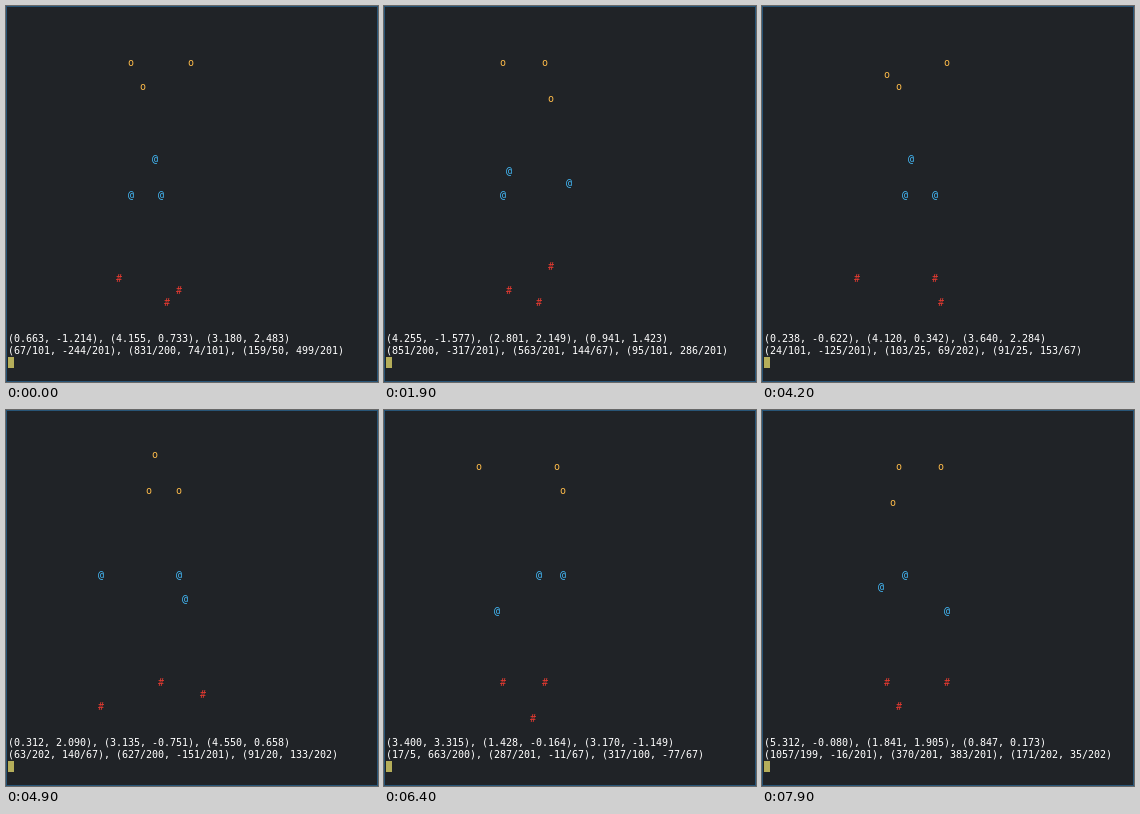
These frames come from a looping animation (372 px wide and 376 px high, 8 s). An HTML page with a canvas:

```html
<!DOCTYPE html>
<html>
<head>
<meta charset="utf-8">
<style>
  html, body { margin: 0; width: 100%; height: 100%; overflow: hidden; background: #202327; }
  canvas { display: block; }
</style>
</head>
<body>
<canvas id="screen" width="372" height="376"></canvas>
<script>
const ctx = document.getElementById('screen').getContext('2d');
const STEP = 100, STEPS = 80;
const triangle = [[0, 0], [4, 0], [4, 2]];
const centre = [8 / 3, 2 / 3];

// The spin is slightly uneven: [step, degrees turned]
const spin = [
  [0, 29.15], [19, 831.32], [29, 1264.51], [42, 1813.91],
  [49, 2114.81], [64, 2760.51], [79, 3390.23]
];

function angleAt(n) {
  const i = Math.max(1, spin.findIndex(k => k[0] >= n));
  const [n0, a0] = spin[i - 1], [n1, a1] = spin[i];
  return a0 + (a1 - a0) * (n - n0) / (n1 - n0);
}

function rotated(deg) {
  const a = deg * Math.PI / 180, c = Math.cos(a), s = Math.sin(a);
  return triangle.map(([x, y]) => {
    const dx = x - centre[0], dy = y - centre[1];
    return [centre[0] + dx * c - dy * s, centre[1] + dx * s + dy * c];
  });
}

const gcd = (a, b) => b ? gcd(b, a % b) : a;

// Denominators shrink slowly as values grow.
function rational(v) {
  const den = v < 0 ? 201 : 202 - Math.floor((v + 1) / 2);
  const num = Math.round(v * den) || 0;
  const g = gcd(Math.abs(num), den);
  return {
    decimal: (num / den).toFixed(3),
    fraction: g === den ? `${num / g}` : `${num / g}/${den / g}`
  };
}

function print(text, col, row, color) {
  ctx.fillStyle = color;
  [...text].forEach((ch, i) => ctx.fillText(ch, 2 + 6 * (col + i), 12 + 12 * row));
}

// Each grid cell is three characters wide, one slot per vertex.
function plot(points, mark, row, color) {
  const cell = v => Math.trunc(v + .5);
  points.forEach(([x, y], i) => print(mark, 15 + i + 3 * cell(x), row + cell(y), color));
}

function draw(n) {
  ctx.fillStyle = '#202327';
  ctx.fillRect(0, 0, 372, 376);
  ctx.strokeStyle = '#285577';
  ctx.strokeRect(.5, .5, 371, 375);
  ctx.font = '10px "DejaVu Sans Mono", "Liberation Mono", monospace';

  const angle = angleAt(n);
  const points = rotated(angle);
  plot(rotated(angle + 120), 'o', 4, '#ffbc4a');
  plot(rotated(angle + 60), '@', 13, '#45bfff');
  plot(points, '#', 22, '#ea3b31');

  const values = points.map(p => p.map(rational));
  ['decimal', 'fraction'].forEach((form, i) => {
    const line = values.map(([x, y]) => `(${x[form]}, ${y[form]})`).join(', ');
    print(line, 0, 27 + i, '#ffffff');
  });
  ctx.fillStyle = '#b5ae5a';
  ctx.fillRect(2, 351, 6, 11);
}

const start = performance.now();
function tick() {
  draw(Math.floor((performance.now() - start) / STEP) % STEPS);
  requestAnimationFrame(tick);
}
tick();
</script>
</body>
</html>
```
